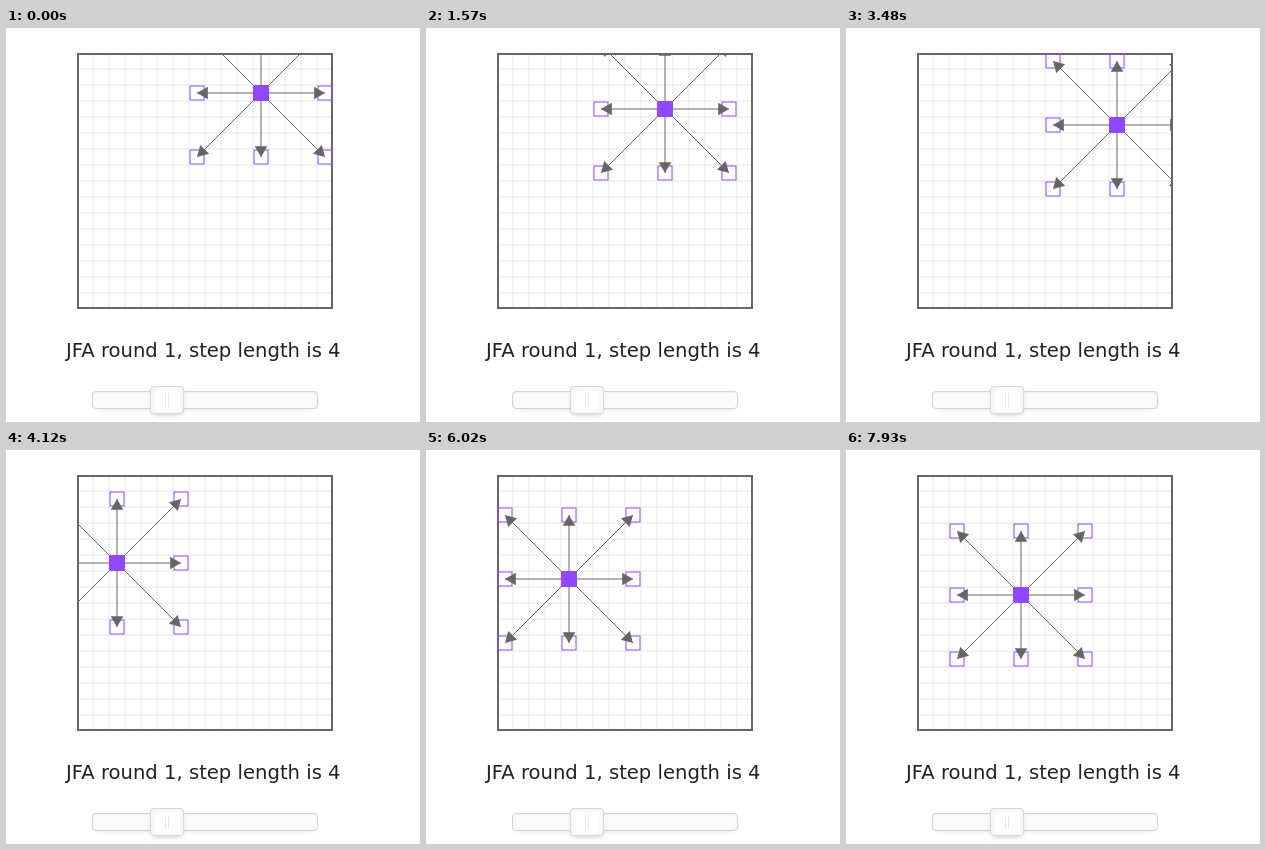
An HTML page with a canvas that plays this animation: 414x394 px, repeating every 8000 ms.

```html
<!DOCTYPE html>
<html lang="en">
<head>
<meta charset="utf-8">
<title>Jump flooding steps</title>
<style>
  html, body { margin: 0; width: 100%; height: 100%; overflow: hidden; background: #fff; }
  body { position: relative; }
  canvas { position: absolute; left: 71px; top: 25px; }
  .label {
    position: absolute; left: 60px; top: 311px; line-height: 24px;
    font-family: "DejaVu Sans", sans-serif; font-size: 19.6px;
    color: #222; white-space: nowrap;
  }
  .track, .handle { position: absolute; box-sizing: border-box; }
  .track {
    left: 86px; top: 363px; width: 226px; height: 18px;
    background: #fafafa; border: 1px solid #d3d3d3; border-radius: 4px;
    box-shadow: inset 0 1px 1px #f0f0f0, 0 3px 6px -5px #bbb;
  }
  .handle {
    left: 144px; top: 358px; width: 34px; height: 28px;
    background: #fff; border: 1px solid #d9d9d9; border-radius: 3px;
    box-shadow: inset 0 0 1px #fff, inset 0 1px 7px #ebebeb, 0 3px 6px -3px #bbb;
  }
  .handle::before, .handle::after {
    content: ""; position: absolute; left: 14px; top: 6px;
    width: 1px; height: 14px; background: #e8e7e6;
  }
  .handle::after { left: 17px; }
</style>
</head>
<body>
<canvas id="board" width="256" height="256"></canvas>
<div class="label">JFA round 1, step length is 4</div>
<div class="track"></div>
<div class="handle"></div>
<script>
const ctx = document.getElementById('board').getContext('2d');
const CELL = 16, COUNT = 16, SIZE = CELL * COUNT, JUMP = 4;
const PURPLE = '#8f48ff', GREY = '#666';
const FIRST_CELL = 2 * COUNT + 11;
const LOOP = 8000;

// Ticks last 80 ms, a few 70 ms; the cell advances three times in four ticks.
const SHORT = [0, 1, 8, 21, 65, 74, 92, 100];
const starts = [];
for (let i = 0, t = 0; t < LOOP; i++) {
  starts.push(t);
  t += SHORT.includes(i) ? 70 : 80;
}

function cellAt(ms) {
  let tick = starts.length - 1;
  while (starts[tick] > ms) tick--;
  return FIRST_CELL + 3 * Math.floor(tick / 4) + Math.max(0, tick % 4 - 1);
}

function line(x1, y1, x2, y2) {
  ctx.beginPath();
  ctx.moveTo(x1, y1);
  ctx.lineTo(x2, y2);
  ctx.stroke();
}

function arrow(x1, y1, x2, y2) {
  const angle = Math.atan2(y2 - y1, x2 - x1), side = 12.5;
  line(x1, y1, x2, y2);
  ctx.beginPath();
  ctx.moveTo(x2, y2);
  for (const turn of [-Math.PI / 6, Math.PI / 6]) {
    ctx.lineTo(x2 - side * Math.cos(angle + turn), y2 - side * Math.sin(angle + turn));
  }
  ctx.fill();
}

function drawGrid() {
  ctx.lineWidth = 1;
  ctx.strokeStyle = '#e8e8e8';
  for (let p = CELL; p < SIZE; p += CELL) {
    line(p, 0, p, SIZE);
    line(0, p, SIZE, p);
  }
  ctx.lineWidth = 2;
  ctx.strokeStyle = GREY;
  ctx.strokeRect(1, 1, SIZE - 2, SIZE - 2);
}

function draw(cell) {
  const col = cell % COUNT, row = Math.floor(cell / COUNT);
  const mid = n => (n + 0.5) * CELL;
  const targets = [];
  for (const dy of [-JUMP, 0, JUMP]) {
    for (const dx of [-JUMP, 0, JUMP]) {
      if (dx || dy) targets.push([col + dx, row + dy]);
    }
  }

  ctx.clearRect(0, 0, SIZE, SIZE);
  drawGrid();
  ctx.lineWidth = 1;
  ctx.strokeStyle = PURPLE;
  for (const [x, y] of targets) {
    ctx.strokeRect(x * CELL + 1, y * CELL + 1, CELL - 2, CELL - 2);
  }
  ctx.strokeStyle = ctx.fillStyle = GREY;
  for (const [x, y] of targets) arrow(mid(col), mid(row), mid(x), mid(y));
  ctx.fillStyle = PURPLE;
  ctx.fillRect(col * CELL, row * CELL, CELL, CELL);
}

const began = performance.now();
function frame() {
  draw(cellAt((performance.now() - began) % LOOP));
  requestAnimationFrame(frame);
}
frame();
</script>
</body>
</html>
```
